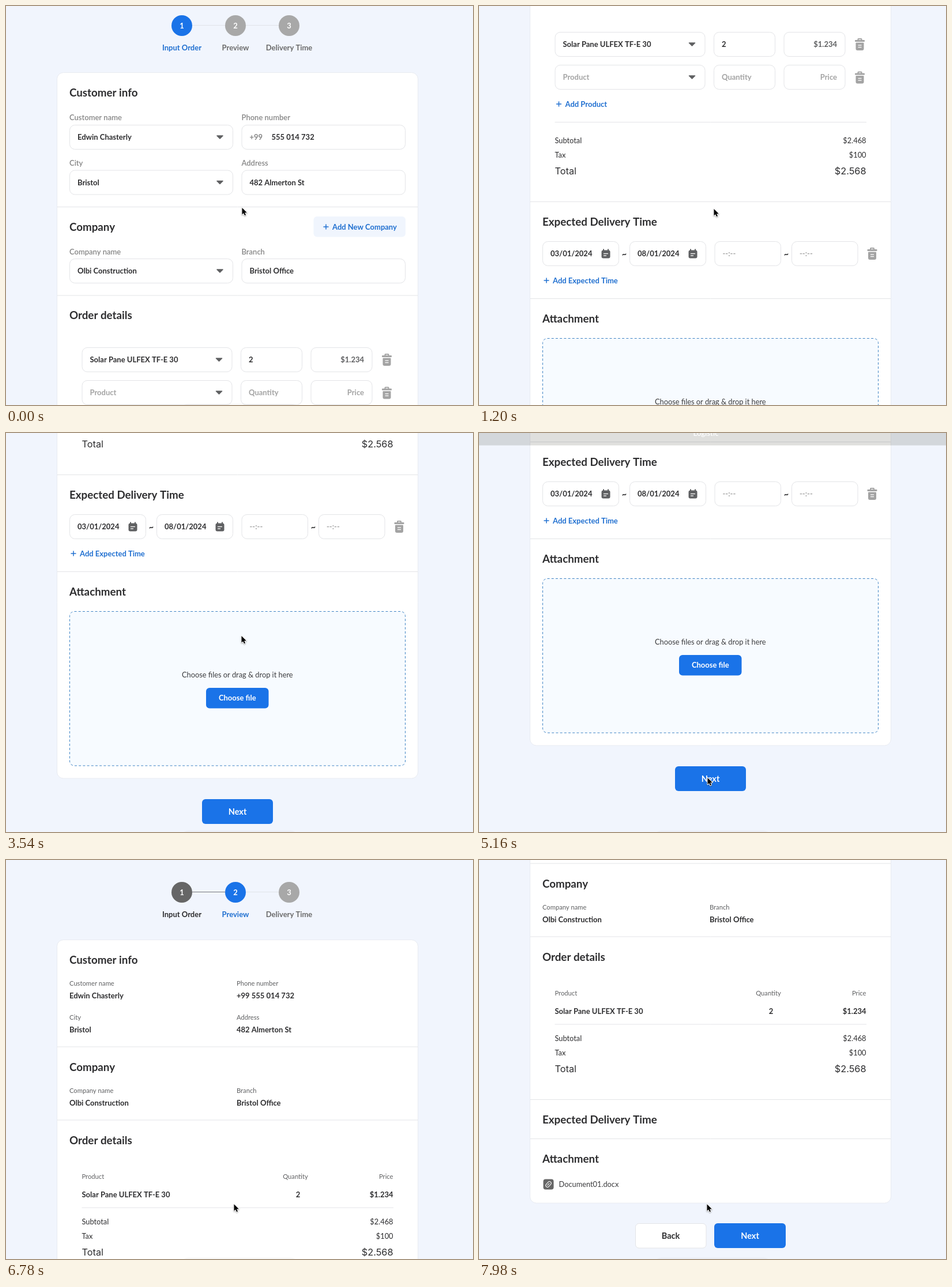
Animation, 810 px wide and 692 px high, one loop 8000 ms. Source, as an HTML page with a canvas:

```html
<!DOCTYPE html>
<html lang="en">
<head>
<meta charset="utf-8">
<title>Order form</title>
<style>
html, body { margin: 0; width: 100%; height: 100%; overflow: hidden; background: #f1f5fd; }
canvas { display: block; width: 810px; height: 692px; }
</style>
</head>
<body>
<canvas id="stage"></canvas>
<script>
const W = 810, H = 692, LOOP = 8000, STEP = 60;
const BG = '#f1f5fd', BLUE = '#1a73e8', LINK = '#1f6fd0', INK = '#2d2d2f',
      DIM = '#858585', PALE = '#a3a3a3', MID = '#5f6062', EDGE = '#e3e4e7';
const canvas = document.getElementById('stage'), c = canvas.getContext('2d');
const ratio = window.devicePixelRatio || 1;
canvas.width = W * ratio;
canvas.height = H * ratio;

// style: [weight, size, family]
const style = {
  head: [700, 18.75], bold: [700, 13], label: [600, 13],
  body: [400, 12.8], small: [400, 11.2], button: [700, 14.5],
  total: [400, 16.3, 'Inter']
};

function text(s, x, y, kind, color = INK, align = 'left') {
  const [weight, size, family = 'Lato'] = style[kind];
  c.font = `${weight} ${size}px ${family}, sans-serif`;
  c.textAlign = align;
  c.fillStyle = color;
  c.fillText(s, x, y + size * 0.355);
}

function box(x, y, w, h, r, fill, stroke) {
  c.beginPath();
  c.roundRect(x, y, w, h, r);
  if (fill) { c.fillStyle = fill; c.fill(); }
  if (stroke) { c.strokeStyle = stroke; c.lineWidth = 1; c.stroke(); }
}

function line(x1, y1, x2, y2, color = EDGE, width = 1) {
  c.beginPath();
  c.moveTo(x1, y1);
  c.lineTo(x2, y2);
  c.strokeStyle = color;
  c.lineWidth = width;
  c.stroke();
}

function caret(x, y) {
  c.beginPath();
  c.moveTo(x - 5, y - 2.3);
  c.lineTo(x + 5, y - 2.3);
  c.lineTo(x, y + 2.5);
  c.closePath();
  c.fillStyle = c.strokeStyle = MID;
  c.lineJoin = 'round';
  c.lineWidth = 1.6;
  c.fill();
  c.stroke();
}

function field(x, y, w, s, color = INK, align = 'left') {
  box(x + .5, y + .5, w - 1, 42, 9, '#fff', EDGE);
  text(s, align === 'right' ? x + w - 14.5 : x + 14, y + 21.5, 'bold', color, align);
}

function select(x, y, w, s, color) {
  field(x, y, w, s, color);
  caret(x + w - 23, y + 21.3);
}

function trash(x, y) {
  box(x - 4, y - 10.5, 8, 5, 1.5, PALE);
  box(x - 2, y - 8.6, 4, 2, 0, '#fff');
  box(x - 8.5, y - 7.5, 17, 3, 1, PALE);
  box(x - 7, y - 3, 14, 13.5, [1, 1, 3, 3], PALE);
  line(x - 3, y + 1.5, x + 3, y + 1.5, '#fff', 1.3);
  line(x - 3, y + 5, x + 3, y + 5, '#fff', 1.3);
}

function calendar(x, y) {
  box(x - 7.5, y - 6, 15, 14, 3, MID);
  line(x - 4, y - 8, x - 4, y - 4, MID, 2);
  line(x + 4, y - 8, x + 4, y - 4, MID, 2);
  line(x - 4, y, x + 4, y, '#fff', 1.3);
  line(x - 4, y + 3.5, x + 1, y + 3.5, '#fff', 1.3);
}

function dateField(x, y, w, s) {
  field(x, y, w, s);
  calendar(x + w - 23, y + 21.5);
}

function addLink(x, y, s) {
  line(x, y, x + 9, y, LINK, 1.5);
  line(x + 4.5, y - 4.5, x + 4.5, y + 4.5, LINK, 1.5);
  text(s, x + 15.5, y, 'bold', LINK);
}

function button(x, y, w, h, s, kind = 'button') {
  box(x, y, w, h, 6, BLUE);
  text(s, x + w / 2, y + h / 2, kind, '#fff', 'center');
}

function card(top, bottom, dividers, heads) {
  box(88.5, top, 626, bottom - top, 11, '#fff', '#e8ebf1');
  dividers.forEach(y => line(89, y, 714, y));
  const names = ['Customer info', 'Company', 'Order details', 'Expected Delivery Time', 'Attachment'];
  names.forEach((s, i) => text(s, 110, heads[i], 'head'));
}

function stepper(y, active) {
  ['Input Order', 'Preview', 'Delivery Time'].forEach((s, i) => {
    const x = 305 + 93 * i, done = i < active, on = i === active;
    if (i < 2) line(x + 18, y - .5, x + 75, y - .5, done ? '#777' : '#e0e3e9');
    c.beginPath();
    c.arc(x, y, 18, 0, 7);
    c.fillStyle = on ? BLUE : done ? '#666' : '#a8a8a8';
    c.fill();
    text(i + 1, x, y, 'bold', '#fff', 'center');
    text(s, x, y + 38, 'bold', on ? LINK : done ? INK : '#6b6b6b', 'center');
  });
}

function totals(y) {
  [['Subtotal', '$2.468', 0, 'body'], ['Tax', '$100', 25, 'body'], ['Total', '$2.568', 53, 'total']]
    .forEach(([name, sum, dy, kind]) => {
      text(name, 131.5, y + dy, kind);
      text(sum, 671.5, y + dy, kind, INK, 'right');
    });
}

const client = 'Edwin Chasterly', dial = '+99', phone = '555 014 732', street = '482 Almerton St',
      firm = 'Olbi Construction', item = 'Solar Pane ULFEX TF-E 30';

function inputPage() {
  stepper(34, 0);
  card(115.5, 1413, [348.5, 502, 886.5, 1054.5], [150.5, 383, 536.5, 921, 1089]);
  text('Customer name', 110, 193.5, 'label', DIM);
  text('Phone number', 408.5, 193.5, 'label', DIM);
  select(110, 206, 284, client);
  field(408.5, 206, 284.5, dial, DIM);
  text(phone, 460.5, 227.5, 'bold');
  text('City', 110, 272, 'label', DIM);
  text('Address', 408.5, 272, 'label', DIM);
  select(110, 284.5, 284, 'Bristol');
  field(408.5, 284.5, 284.5, street);

  box(533.5, 365, 159.5, 35.5, 6, '#f0f5fd');
  addLink(550.5, 383, 'Add New Company');
  text('Company name', 110, 426, 'label', DIM);
  text('Branch', 408.5, 426, 'label', DIM);
  select(110, 438, 284, firm);
  field(408.5, 438, 284.5, 'Bristol Office');

  select(131.5, 592, 261, item);
  field(407, 592, 107, '2');
  field(528.5, 592, 107, '$1.234', MID, 'right');
  trash(660.5, 613.5);
  select(131.5, 649, 261, 'Product', PALE);
  field(407, 649, 107, 'Quantity', PALE);
  field(528.5, 649, 107, 'Price', PALE, 'right');
  trash(660.5, 671);
  addLink(134, 717, 'Add Product');
  line(131.5, 748.5, 672, 748.5);
  totals(780);

  dateField(110, 955, 133, '03/01/2024');
  dateField(261, 955, 133, '08/01/2024');
  field(408.5, 955, 115.5, '--:--', PALE);
  field(542, 955, 115.5, '--:--', PALE);
  text('~', 252, 976.5, 'button', INK, 'center');
  text('~', 533, 976.5, 'button', INK, 'center');
  trash(682, 976.5);
  addLink(112.5, 1023, 'Add Expected Time');

  c.setLineDash([4, 3.2]);
  box(110.5, 1123.5, 582, 267.5, 8, '#f7fbff', '#3f83c4');
  c.setLineDash([]);
  text('Choose files or drag & drop it here', 401.3, 1233, 'body', '#3c3c3e', 'center');
  button(347, 1256, 108.5, 35.5, 'Choose file', 'bold');
  button(340, 1449, 123, 43, 'Next');
}

function pair(x, y, name, value) {
  text(name, x, y, 'small', MID);
  text(value, x, y + 21, 'bold');
}

function previewPage() {
  stepper(56, 1);
  card(138.5, 913, [324, 451, 733.5, 801.5], [173, 359, 486, 768.5, 836.5]);
  pair(110, 214.5, 'Customer name', client);
  pair(400, 214.5, 'Phone number', dial + ' ' + phone);
  pair(110, 273.5, 'City', 'Bristol');
  pair(400, 273.5, 'Address', street);
  pair(110, 400.5, 'Company name', firm);
  pair(400, 400.5, 'Branch', 'Bristol Office');

  text('Product', 131.5, 549, 'small', MID);
  text('Quantity', 502, 549, 'small', MID, 'center');
  text('Price', 671.5, 549, 'small', MID, 'right');
  text(item, 131.5, 580.5, 'bold');
  text('2', 506.5, 580.5, 'bold', INK, 'center');
  text('$1.234', 671.5, 580.5, 'bold', INK, 'right');
  line(131.5, 603, 672, 603);
  totals(627);

  box(111.5, 871.5, 18, 18, 4, '#666');
  c.save();
  c.translate(120.5, 880.5);
  c.rotate(.75);
  box(-3, -5.5, 6, 11, 3, null, '#fff');
  line(0, -2.5, 0, 3, '#fff');
  c.restore();
  text('Document01.docx', 138.5, 880.5, 'body', '#3c3c3e');
  box(271.5, 948.5, 122.5, 42.5, 6, '#fff', EDGE);
  text('Back', 332.5, 969.5, 'button', INK, 'center');
  button(408, 948, 124, 43, 'Next');
}

const flick = p => 1 - Math.pow(1 - Math.pow(p, 1.4), 3);
const smooth = p => p * p * (3 - 2 * p);
const out = p => 1 - Math.pow(1 - p, 3);
const part = (t, a, b) => Math.min(1, Math.max(0, (t - a) / (b - a)));

// runs: [start, end, distance, ease]
const travel = (t, from, runs) =>
  runs.reduce((sum, [a, b, d, ease]) => sum + d * ease(part(t, a, b)), from);

const inputRuns = [[0, 1200, 547, flick], [1500, 2340, 51, flick], [2340, 3180, 172, flick], [3300, 4140, 101, flick]];
const previewRuns = [[6600, 7200, 171, smooth], [7560, 8160, 235, smooth]];
const mouseX = [[0, 1200, -2, smooth], [1560, 2520, -1, smooth], [2520, 3540, 2, smooth], [4320, 4920, -12, smooth], [6360, 6420, -1, smooth]];
const mouseY = [[0, 1200, 2, smooth], [4320, 4920, 246, smooth], [6360, 6420, -1, smooth]];

function page(draw, x, scroll) {
  c.save();
  c.translate(x, -Math.round(scroll));
  draw();
  c.restore();
}

function mouse(x, y) {
  c.save();
  c.translate(x, y);
  c.beginPath();
  [[.5, 0], [.5, 11.5], [3.2, 9.2], [5, 13.3], [7, 12.4], [5.2, 8.4], [8.8, 8.2]]
    .forEach(p => c.lineTo(...p));
  c.closePath();
  c.lineJoin = 'round';
  c.strokeStyle = '#fff';
  c.lineWidth = 2;
  c.shadowColor = 'rgba(0,0,0,.35)';
  c.shadowBlur = 2 * ratio;
  c.shadowOffsetY = ratio;
  c.stroke();
  c.shadowColor = 'transparent';
  c.fillStyle = '#000';
  c.fill();
  c.restore();
}

function topBar(t) {
  if (t < 5160 || t >= 5400) return;
  const h = 21.5 * Math.pow(1 - part(t, 5160, 5400), 1.6);
  c.fillStyle = 'rgba(40,40,30,.15)';
  c.fillRect(0, 0, W, h);
  text('Logistic', 393.5, h - 21, 'label', '#fff', 'center');
}

function render(t) {
  c.setTransform(ratio, 0, 0, ratio, 0, 0);
  c.fillStyle = BG;
  c.fillRect(0, 0, W, H);
  const slide = Math.round(W * out(part(t, 5640, 6120)));
  if (slide < W) page(inputPage, -slide, travel(t, 0, inputRuns));
  if (slide > 0) page(previewPage, W - slide, travel(t, -37, previewRuns));
  box(304, 689.5, 202, 30, 12, 'rgba(60,60,60,.035)');
  topBar(t);
  mouse(travel(t, 409, mouseX), travel(t, 350, mouseY));
}

const start = performance.now();
function tick() {
  const t = (performance.now() - start) % LOOP;
  render(Math.floor(t / STEP) * STEP);
  requestAnimationFrame(tick);
}
tick();
</script>
</body>
</html>
```
